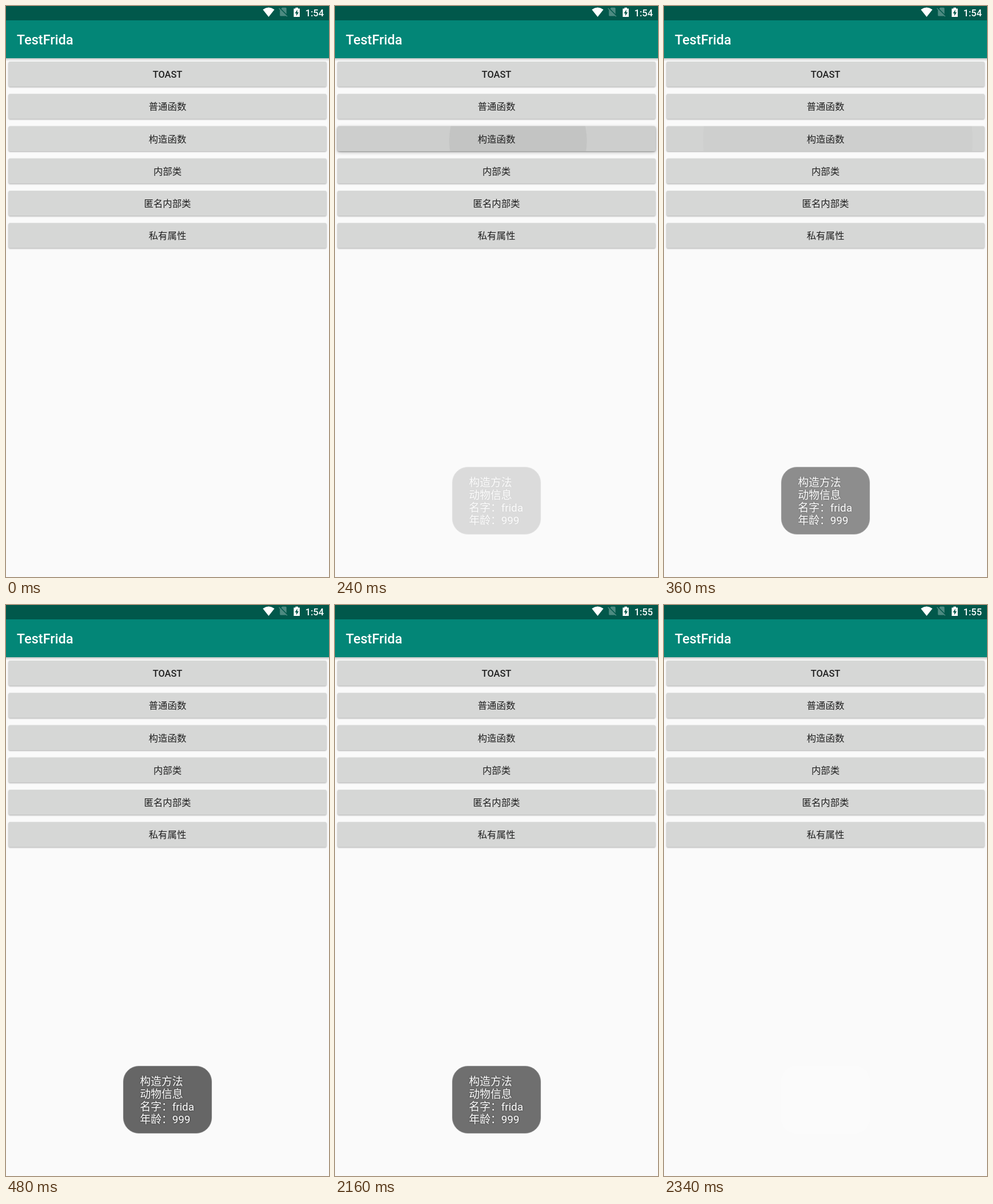
An HTML page for the animation above (3.9 s loop, 563x995 px).

```html
<!DOCTYPE html>
<html lang="zh-CN">
<head>
<meta charset="utf-8">
<title>TestFrida</title>
<style>
html, body { margin: 0; width: 100%; height: 100%; overflow: hidden; background: #fafafa; }
svg { display: block; width: 563px; height: 995px; }
text { font-family: Roboto, "Noto Sans CJK SC", "Noto Sans CJK", sans-serif; white-space: pre; }
.time { font-size: 16.4px; font-weight: 500; fill: #fff; text-anchor: end; }
.title { font-size: 23.46px; font-weight: 500; fill: #fff; }
.label { font-size: 16.42px; font-weight: 500; fill: #212121; text-anchor: middle; }
.button { fill: #d6d7d6; filter: drop-shadow(0 1px 1px rgba(0, 0, 0, .32)); }
.raised { fill: #d6d7d6; filter: drop-shadow(0 2px 3px rgba(0, 0, 0, .5)); }
.message { font-size: 18.75px; font-stretch: 75%; fill: #fff; filter: drop-shadow(0 0 1.5px rgba(0, 0, 0, .5)); }

.anim { animation: 3.9s step-end infinite; }
.raised { animation-name: raise; }
.press { animation-name: press; }
.ripple { animation-name: ripple; }
.toast { animation-name: toast; }
.ghost { animation-name: ghost; }
.before { animation-name: before; }
.after { animation-name: after; }

/* 1.538% is one 60 ms tick */
@keyframes raise {
  0% { opacity: 0; }
  1.538% { opacity: .3; }
  3.076% { opacity: .65; }
  4.615% { opacity: 1; }
  6.153% { opacity: .5; }
  7.692%, 100% { opacity: 0; }
}
@keyframes press {
  0% { opacity: 0; }
  1.538% { opacity: .025; }
  3.076% { opacity: .045; }
  4.615% { opacity: .053; }
  6.153% { opacity: .045; }
  7.692% { opacity: .03; }
  9.23% { opacity: .018; }
  10.769% { opacity: .008; }
  12.307%, 100% { opacity: 0; }
}
@keyframes ripple {
  0% { cx: 326px; r: 0; opacity: 0; }
  1.538% { cx: 326px; r: 14px; opacity: .03; }
  3.076% { cx: 325px; r: 28px; opacity: .055; }
  4.615% { cx: 323.5px; r: 42.5px; opacity: .058; }
  6.153% { cx: 319px; r: 120px; opacity: .044; }
  7.692% { cx: 314.5px; r: 193px; opacity: .026; }
  9.23% { cx: 303px; r: 235px; opacity: .014; }
  10.769% { cx: 292px; r: 262px; opacity: .006; }
  12.307%, 100% { cx: 281px; r: 278px; opacity: 0; }
}
@keyframes toast {
  0% { opacity: 0; }
  6.153% { opacity: .2; }
  7.692% { opacity: .46; }
  9.23% { opacity: .73; }
  10.769% { opacity: .92; }
  12.307% { opacity: 1; }
  55.384% { opacity: .94; }
  56.923% { opacity: .65; }
  58.461% { opacity: .28; }
  60%, 100% { opacity: 0; }
}
@keyframes ghost {
  0% { opacity: 0; }
  60%, 100% { opacity: 1; }
}
@keyframes before {
  0% { opacity: 1; }
  41.538%, 100% { opacity: 0; }
}
@keyframes after {
  0% { opacity: 0; }
  41.538%, 100% { opacity: 1; }
}
</style>
</head>
<body>
<svg viewBox="0 0 563 995">
  <defs>
    <linearGradient id="shade" x2="0" y2="1">
      <stop stop-opacity=".2"/>
      <stop offset="1" stop-opacity="0"/>
    </linearGradient>
    <clipPath id="face"><rect x="4.5" y="209.5" width="554" height="43.5" rx="2"/></clipPath>
  </defs>

  <rect width="563" height="995" fill="#fafafa"/>
  <rect y="91" width="563" height="5" fill="url(#shade)"/>
  <rect y="25" width="563" height="66" fill="#038677"/>
  <rect width="563" height="25" fill="#01584b"/>

  <path d="M457.8 19 447.7 6.2Q457.8-1.2 467.9 6.2Z" fill="#fff"/>
  <path transform="translate(473.3 .3) scale(.82)" fill="#fff" fill-opacity=".3"
    d="M19 5c0-1.1-.9-2-2-2h-7L7.7 5.3 19 16.7ZM3.65 3.9 2.4 5.15 5 7.8V19c0 1.1.9 2 2 2h10c.35 0 .7-.1 1-.26l1.9 1.9 1.2-1.3Z"/>
  <path d="M504.5 4.5V2.8h4.5V4.5h3V19h-10.500V4.500Z" fill="#fff"/>
  <path d="M507.700 6.500 503.600 12.700h2.500v4.500l4.100-6.200h-2.500Z" fill="#01584b"/>
  <text class="time anim before" x="554" y="17.5">1:54</text>
  <text class="time anim after" x="554" y="17.5">1:55</text>
  <text class="title" x="18.7" y="66.7">TestFrida</text>

  <g id="buttons"></g>
  <rect class="raised anim" x="4.5" y="209.5" width="554" height="43.5" rx="2"/>
  <g clip-path="url(#face)">
    <rect class="press anim" x="4" y="209" width="555" height="45"/>
    <circle class="ripple anim" cx="326" cy="235" r="0"/>
  </g>
  <g id="labels"></g>

  <g class="toast anim">
    <rect x="204.500" y="803.500" width="154" height="117" rx="27" fill="#666" stroke="#8c8c8c" stroke-width=".8"/>
    <g id="message"></g>
  </g>
  <rect class="ghost anim" x="204" y="803" width="155" height="118" rx="27" fill="#fbfbfb"/>
</svg>
<script>
const labels = ['TOAST', '普通函数', '构造函数', '内部类', '匿名内部类', '私有属性'];
const message = ['构造方法', '动物信息', '名字：frida', '年龄：999'];

function add(parent, tag, attrs, text = '') {
  const el = document.createElementNS('http://www.w3.org/2000/svg', tag);
  for (const key in attrs) el.setAttribute(key, attrs[key]);
  el.textContent = text;
  document.getElementById(parent).append(el);
}

labels.forEach((label, i) => {
  const y = 56.25 * i;
  add('buttons', 'rect', { class: 'button', x: 4.5, y: 97 + y, width: 554, height: 43.5, rx: 2 });
  add('labels', 'text', { class: 'label', x: 281.5, y: 125.2 + y }, label);
});
message.forEach((line, i) =>
  add('message', 'text', { class: 'message', x: 233.4, y: 837.2 + 21.8 * i }, line));
</script>
</body>
</html>
```
